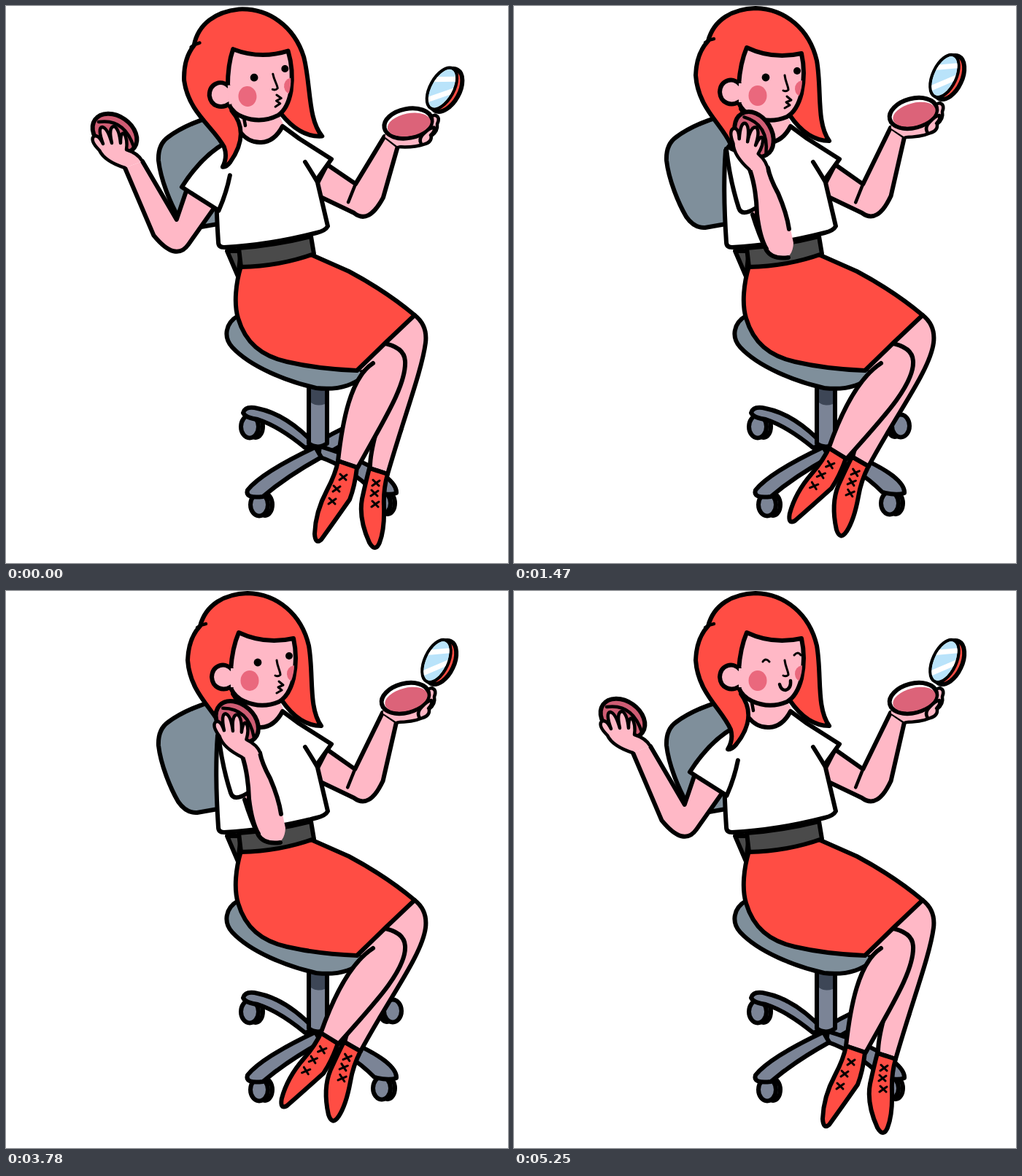
An HTML page that plays this animation: 688 px wide and 764 px high, repeating every 5320 ms.

```html
<!DOCTYPE html>
<html lang="en">
<head>
<meta charset="utf-8">
<title>Powder break</title>
<style>
html, body { margin: 0; width: 100%; height: 100%; overflow: hidden; background: #fff; }
svg { display: block; width: 688px; height: 764px; }
path, ellipse, circle { stroke: #000; stroke-width: 6; stroke-linecap: round; stroke-linejoin: round; fill: none; }
.skin { fill: #ffb8c6; }
.red { fill: #ff4d44; }
.white { fill: #fff; }
.pad { fill: #7f8f9b; }
.metal { fill: #7b8496; }
.shade { fill: #3d4656; }
.belt { fill: #4a4a4a; }
.blush { fill: #ea687d; }
.rouge { fill: #dc6379; }
.puff { fill: #cf5d74; }
.sky { fill: #b9e3fa; }
.bare { stroke: none; }
.fine { stroke-width: 4.5; }
.thin { stroke-width: 3; }
.shine { stroke: #fff; stroke-width: 7; }
.dot { fill: #000; stroke: none; }
</style>
</head>
<body>
<svg viewBox="0 0 688 764">
  <defs>
    <clipPath id="glass"><ellipse cx="43" cy="-51" rx="14" ry="29" transform="rotate(25 43 -51)"/></clipPath>
    <g id="wheel">
      <ellipse class="metal" cx="8" cy="0" rx="10" ry="15"/>
      <ellipse class="metal" rx="12" ry="15.5"/>
    </g>
    <path id="x" class="thin" d="M-4 -4L4 4M5 -3L-5 4"/>
    <g id="powder">
      <ellipse class="puff" rx="33" ry="24" transform="rotate(35)"/>
      <path class="fine" d="M-22 -16Q13 -21 26 18"/>
      <path class="skin fine" d="M14 47Q-14 38 -21 23Q-34 10 -29 4Q-23 0 -16 14Q-24 -8 -17 -9Q-10 -8 -4 13Q-9 -9 -1 -10Q6 -7 8 13Q8 -3 13 0Q18 8 16 22Q32 27 38 38"/>
    </g>
  </defs>

  <g id="chair">
    <path class="pad" d="M300 149C270 152 238 168 222 180Q208 190 209 212C212 238 225 270 236 289Q247 305 262 304L296 298Z"/>
    <path class="metal" d="M428 598Q470 572 520 556L534 566Q490 585 440 614Z"/>
    <use href="#wheel" transform="translate(530 576) scale(-1 1)"/>
    <use href="#wheel" transform="translate(334 577)"/>
    <use href="#wheel" transform="translate(347 684)"/>
    <use href="#wheel" transform="translate(515 682)"/>
    <path class="metal" d="M424 602Q385 560 345 552Q328 548 325 558Q328 565 345 567Q375 577 410 606Z"/>
    <path class="metal" d="M430 604Q490 622 520 645Q536 658 535 668Q525 672 505 667Q470 632 428 618Z"/>
    <path class="metal" d="M424 605Q350 640 331 664Q327 676 352 673Q385 645 432 619Z"/>
    <path class="metal" d="M415 520V600Q427 609 440 600V520Z"/>
    <path class="shade bare" d="M418 522H437V546Q426 550 418 544Z"/>
    <path class="pad" d="M318 425C300 435 298 455 310 468C335 495 385 515 425 524C460 528 482 517 492 505L450 460Z"/>
    <path class="belt" d="M303 336L318 371L322 336Z"/>
  </g>

  <g id="legs">
    <path id="shinBack" class="skin"/>
    <g id="shoeBack">
      <path class="red" d="M-13 -4L12 4Q6 25 7 48Q8 80 1 98Q-5 112 -13 98Q-28 65 -23 38Q-18 15 -13 -4Z"/>
      <use href="#x" x="-4" y="16"/><use href="#x" x="-6" y="30"/><use href="#x" x="-5" y="45"/>
    </g>
    <path class="skin bare" d="M484 500L506 494L530 470L560 424Z"/>
    <path id="shinFront" class="skin"/>
    <g id="shoeFront">
      <path class="red" d="M-13 -5L13 4Q10 30 3 48Q-18 78 -36 103Q-44 110 -45 95Q-44 65 -28 35Q-16 12 -13 -5Z"/>
      <use href="#x" x="-6" y="17"/><use href="#x" x="-15" y="33"/><use href="#x" x="-21" y="50"/>
    </g>
  </g>

  <path class="red" d="M322 357C315 380 312 408 318 428C328 462 350 480 385 488C415 495 455 499 481 500L520 462L560 424C535 403 500 380 470 364L418 341Q370 352 322 357Z"/>
  <path class="belt" d="M319 332L322 358Q375 357 422 340L418 316Q370 328 319 332Z"/>

  <path id="armR" class="skin"/>
  <path id="creaseR" class="fine"/>
  <g id="compact">
    <path class="skin fine" d="M-31 20L-12 33Q10 33 24 27Q34 24 33 15Q42 8 40 -2Q44 -12 36 -14L0 0Z"/>
    <path class="skin bare" d="M-30 14L-30 21L-13 32L6 26Z"/>
    <ellipse class="white" rx="33" ry="20" transform="rotate(-15)"/>
    <ellipse class="rouge bare" cx="1" cy="2" rx="30" ry="15.5" transform="rotate(-15)"/>
    <path class="skin fine" d="M20 27Q15 20 23 12Q30 4 36 3Q38 8 32 14"/>
    <ellipse class="red" cx="49" cy="-49" rx="18" ry="32" transform="rotate(25 49 -49)"/>
    <ellipse class="white fine" cx="43" cy="-51" rx="16" ry="31" transform="rotate(25 43 -51)"/>
    <g clip-path="url(#glass)">
      <path class="sky bare" d="M10 -95H80V0H10Z"/>
      <path class="shine" d="M24 -62L70 -66M24 -34L64 -51"/>
    </g>
  </g>

  <path class="skin bare" d="M324 148L316 176Q345 200 382 166L370 140Z"/>
  <path class="fine" d="M326 153L328 164"/>
  <path class="white" d="M321 173Q333 188 350 187Q368 186 379 165L402 182L446 210L426 238L441 302Q438 308 426 311Q360 328 299 331Q291 331 291 324Q286 250 290 198Q300 184 321 173Z"/>
  <path d="M410 214Q417 225 426 240"/>

  <g id="armSide">
    <path id="armL" class="skin"/>
    <use id="handL" href="#powder"/>
    <path id="sleeveL" class="white"/>
  </g>

  <g id="head">
    <path class="red" d="M293 217Q301 204 297 190C285 162 252 140 249 95Q250 65 266 48C274 18 300 4 331 3C372 4 405 32 415 75C422 115 414 160 432 185Q402 185 378 150L311 141C325 160 326 184 304 211Q298 218 293 217Z"/>
    <path class="fine" d="M262 50Q268 46 274 45"/>
    <path class="skin" d="M319 57Q355 74 394 65Q400 92 394 120Q388 144 374 152Q350 162 326 151Q313 145 308 133L308 108Q310 78 319 57Z"/>
    <path class="skin" d="M309 107C300 97 283 101 282 118C283 134 298 138 309 131"/>
    <path class="skin bare" d="M308 106H314V132H308Z"/>
    <ellipse class="blush bare" cx="334" cy="123" rx="12.5" ry="14"/>
    <path class="blush bare" d="M395 102Q385 104 385 114Q386 122 391 123Q395 112 395 102Z"/>
    <path class="thin" d="M371 95C372 104 376 110 376 115Q373 118 369 116"/>
    <g id="kiss">
      <circle class="dot" cx="345" cy="98" r="5.4"/>
      <circle class="dot" cx="388" cy="89" r="5"/>
      <path class="thin" d="M374 124L380 129L373 132L378 136L371 140"/>
    </g>
    <g id="smile">
      <path class="thin" d="M341 97Q345 91 350 97M384 88Q389 82 393 88"/>
      <path class="fine" d="M364 128Q366 136 372 136Q380 134 379 123"/>
    </g>
  </g>

  <g id="armFront">
    <path class="white bare" d="M291 196Q296 240 308 277Q312 289 330 278L334 215Z"/>
    <path d="M291 196Q296 240 308 277Q312 289 330 278"/>
    <g id="forearm">
      <path class="skin bare" d="M348 222Q352 245 362 262Q378 295 383 325Q382 346 366 347Q350 346 343 325L326 284L331 280Q330 250 322 224Z"/>
      <path d="M323 224Q332 250 333 285Q337 318 346 333M327 286Q336 315 346 335Q354 348 376 345M348 222Q351 237 362 257Q374 285 377 306"/>
      <use id="handF" href="#powder"/>
    </g>
  </g>
</svg>

<script>
const LOOP = 5320, STEP = 70, PAT = 653;
const el = Object.fromEntries([...document.querySelectorAll('[id]')].map(e => [e.id, e]));

const rad = deg => deg * Math.PI / 180;
const add = (p, q, k = 1) => [p[0] + q[0] * k, p[1] + q[1] * k];
const dot = (p, q) => p[0] * q[0] + p[1] * q[1];
const unit = v => { const l = Math.hypot(...v); return [v[0] / l, v[1] / l]; };
const toward = (p, q) => unit(add(q, p, -1));
const mix = (a, b, k) => a.map((v, i) => v + (b[i] - v) * k);
const ramp = (t, from, to) => {
  const k = Math.min(1, Math.max(0, (t - from) / (to - from)));
  return k * k * (3 - 2 * k);
};

// The normal of v that lies on the side of w.
function normal(v, w) {
  const n = [-v[1], v[0]];
  return dot(n, w) < 0 ? [v[1], -v[0]] : n;
}

// Eased pose at time t; each step is [time, pose].
function poseAt(steps, t) {
  return steps.reduce((pose, [at, next], i) =>
    i ? mix(pose, next, ramp(t, steps[i - 1][0], at)) : next, null);
}

const place = (node, [x, y, turn]) => node.setAttribute('transform', `translate(${x} ${y}) rotate(${turn})`);
const path = (node, d) => node.setAttribute('d', d);

// Point of a placed part on the stage.
function local([x, y, turn], px, py) {
  const c = Math.cos(rad(turn)), s = Math.sin(rad(turn));
  return [x + px * c - py * s, y + px * s + py * c];
}

// Bent arm outline: open at the wrist, widest at the elbow.
function drawArm(node, top, elbow, wristIn, wristOut, half) {
  const u = toward(top, elbow), f = toward(elbow, mix(wristIn, wristOut, .5));
  const bend = unit(add(f, u, -1));
  const n = normal(u, bend), m = normal(f, [-bend[0], -bend[1]]);
  const inner = add(elbow, bend, 23), tip = add(elbow, bend, -36);
  const under = add(elbow, n, -20), outer = add(add(elbow, f, 17), m, 26);
  path(node, `M${wristIn}L${inner}L${add(top, n, half)}L${add(top, n, -half)}L${under}Q${tip} ${outer}L${wristOut}`);
  return inner;
}

const SHOULDER = [299, 213], ELBOW_R = [486, 266];

// Hand x, y, turn and upper arm angle
const up = [149, 175, 0, 122.5], out = [111, 260, -38, 112], near = [225, 182, 12, 100], tipped = [155, 175, 7, 122.5];
const leftSteps = [[0, up], [420, out], [700, out], [1160, up], [1350, near], [4200, near], [4500, tipped], [4760, up]];

// Compact x, y, turn
const wide = [578, 183, 21];
const rightSteps = [[0, [551, 161, 4]], [420, wide], [820, wide], [1470, [547, 147, 0]]];

function drawLeft(t) {
  const hand = poseAt(leftSteps, t), a = rad(hand[3]);
  const u = [Math.cos(a), Math.sin(a)], n = [-u[1], u[0]];
  const at = (along, across) => add(add(SHOULDER, u, along), n, across);
  place(el.handL, hand);
  drawArm(el.armL, at(58, 0), at(122, 0), local(hand, 38, 38), local(hand, 14, 47), 23);
  path(el.sleeveL, `M302 187Q${at(10, 30)} ${at(61, 30)}L${at(61, -30)}Q${at(35, -26)} ${at(12, -17)}`);
}

function drawRight(t) {
  const compact = poseAt(rightSteps, t);
  place(el.compact, compact);
  const inner = drawArm(el.armR, [430, 237], ELBOW_R, local(compact, -31, 20), local(compact, -12, 33), 22);
  path(el.creaseR, `M${inner}L${add(inner, [-10, 25])}`);
}

function drawLegs(t) {
  const swing = ramp(t, 0, 400) - ramp(t, 4050, 4500);
  const front = mix([468, 629, 0], [443, 614, 13], swing);
  const back = mix([511, 638, 0], [475, 625, 12], swing);
  place(el.shoeFront, front);
  place(el.shoeBack, back);
  const f = (x, y) => local(front, x, y), b = (x, y) => local(back, x, y);
  path(el.shinFront, `M503 490C472 510 ${f(-7, -59)} ${f(-13, -5)}L${f(14, 4)}C${f(48, -58)} 549 520 547 487Q546 467 514 462`);
  path(el.shinBack, `M560 424Q578 438 575 462C570 500 ${b(35, -76)} ${b(12, 4)}L${b(-12, -4)}Q${b(-13, -38)} 535 500L512 490`);
}

function show(node, on) { node.style.display = on ? '' : 'none'; }

function render(t) {
  drawLeft(t);
  drawRight(t);
  drawLegs(t);
  el.head.setAttribute('transform', `rotate(${4.2 * (ramp(t, 0, 1400) - 1)} 345 165)`);

  // The arm passes in front of the body while she pats her cheek.
  const front = t >= 1400 && t < 4200;
  show(el.armSide, !front);
  show(el.armFront, front);
  const swing = 40 * (ramp(t, 1330, 1470) - ramp(t, 4060, 4200) - 1);
  el.forearm.setAttribute('transform', `rotate(${swing} 365 335)`);
  const pat = 8 * (Math.cos((t - 1470) / PAT * 2 * Math.PI) - 1);
  el.handF.setAttribute('transform', `rotate(${pat} 336 222) translate(329 176) rotate(24)`);

  const happy = t >= 4830;
  show(el.kiss, !happy);
  show(el.smile, happy);
}

const start = performance.now();
function tick() {
  const t = (performance.now() - start) % LOOP;
  render(Math.floor(t / STEP) * STEP);
  requestAnimationFrame(tick);
}
tick();
</script>
</body>
</html>
```
